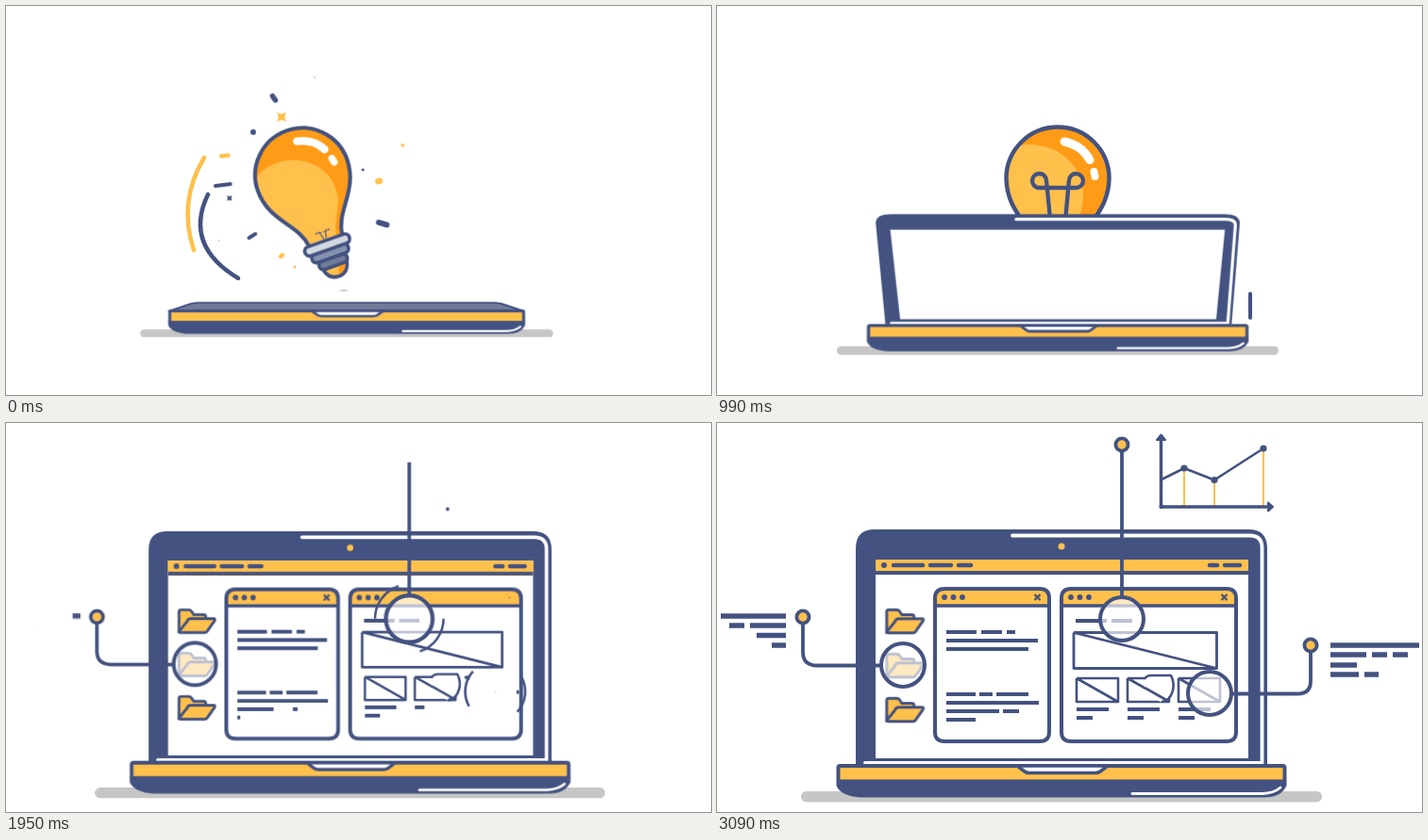
Write an HTML page that moves like this. It is 747x413 px and loops after 3120 ms.

```html
<!DOCTYPE html>
<html lang="en">
<head>
<meta charset="utf-8">
<title>Idea to laptop</title>
<style>
  html, body { margin: 0; width: 100%; height: 100%; overflow: hidden; background: #fff; }
  svg { display: block; width: 100%; height: 100%; }
  .navy { fill: #435280; }
  .sun { fill: #ffc04c; }
  .line { fill: none; stroke: #435280; }
  .edge { stroke: #435280; stroke-linejoin: round; }
  .shine { fill: none; stroke: #fff; stroke-linecap: round; }
  .shade { fill: #c6c6c6; }
  #stage { transform-origin: 346.6px 201.6px; }
</style>
</head>
<body>
<svg viewBox="0 0 747 413">
  <defs>
    <path id="glass" d="M341 243C338 213 307 201 306.500 162A54.500 54.500 0 0 1 415.500 162C415 201 384 213 381 243Z"/>
    <clipPath id="inGlass"><use href="#glass"/></clipPath>
  </defs>

  <g id="sparks"></g>
  <ellipse id="bulbShade" class="shade" cx="361" cy="302" rx="36" ry="4.500"/>

  <g id="bulb"><g transform="translate(-361 -287)">
    <use href="#glass" fill="#ff9b16"/>
    <g clip-path="url(#inGlass)"><path id="glow" class="sun"/></g>
    <g id="filament"><path class="line" stroke-width="4.300" transform="translate(-361 -240)"
      d="M356.500 240 349 164A7.500 7.500 0 1 0 341.500 172H380A7.500 7.500 0 1 0 373 164L366 240"/></g>
    <use href="#glass" class="line" stroke-width="4.500"/>
    <path class="shine" stroke-width="9" d="M368 123Q387 127 395 142.500"/>
    <path class="shine" stroke-width="8" d="M399.500 155 400.500 160"/>
    <g class="edge" stroke-width="4">
      <path class="sun" d="M347 273H376Q373 286 361.500 286Q350 286 347 273Z"/>
      <path fill="#ff9b16" stroke="none" d="M365 274H374Q371 283 363 284Z"/>
      <rect x="344" y="263" width="34" height="10" rx="5" fill="#717c9a"/>
      <rect x="339" y="252" width="44" height="11" rx="5" fill="#8592b0"/>
      <rect x="334" y="242" width="54" height="11" rx="5" fill="#d3d9e0"/>
    </g>
  </g></g>

  <g id="stage">
    <g id="lid">
      <path id="shell" class="navy"/>
      <path id="screen" fill="#fff"/>
      <path id="rim" class="shine" stroke-width="3.800"/>
    </g>
    <g id="base">
      <rect class="shade" x="89" y="391" width="552" height="11.500" rx="5.700"/>
      <path id="cover" class="edge" fill="#717a97" stroke-width="3.500" d="M128 364 157 350Q162 348 167 348H562Q567 348 572 350L601 364Z"/>
      <path class="navy" d="M126.500 379H603.500V385Q598 397.500 580 397.500H152Q131 396 126.500 385Z"/>
      <rect class="sun edge" x="128.500" y="364" width="473" height="16.500" rx="2" stroke-width="4"/>
      <path class="edge" fill="#fff" stroke-width="3.500" d="M318 364 326 370Q328 371.500 331 371.500H401Q404 371.500 406 370L414 364Z"/>
      <path class="shine" stroke-width="2.800" d="M440 393.500H578Q590 393 597 387"/>
    </g>
    <g id="desk"></g>
  </g>
</svg>
<script>
const LOOP = 3120, NAVY = '#435280', SUN = '#ffc04c';
const $ = id => document.getElementById(id);
const desk = $('desk'), sparks = $('sparks');
let css = '', count = 0;

function add(parent, tag, attrs) {
  const el = document.createElementNS('http://www.w3.org/2000/svg', tag);
  for (const name in attrs) el.setAttribute(name, attrs[name]);
  return parent.appendChild(el);
}

// Frames are [ms, declarations]; the first and last are held to the loop's ends.
function key(el, frames, ease = 'ease-in-out') {
  const steps = [[0, frames[0][1]], ...frames, [LOOP, frames.at(-1)[1]]];
  const rules = steps.map(([ms, rule]) => `${(ms / LOOP * 100).toFixed(3)}%{${rule}}`);
  css += `@keyframes k${count}{${rules.join('')}}`;
  el.style.animation = `k${count++} ${LOOP}ms ${ease} infinite`;
}

function pop(el, x, y, start, dur = 180) {
  el.style.transformOrigin = `${x}px ${y}px`;
  key(el, [[start, 'transform:scale(0)'], [start + dur * .7, 'transform:scale(1.1)'], [start + dur, 'transform:scale(1)']]);
}

function draw(parent, d, start, dur, width, color = NAVY, leave) {
  const el = add(parent, 'path', {
    d, pathLength: 1, fill: 'none', stroke: color, 'stroke-width': width,
    'stroke-linejoin': 'round', 'stroke-dasharray': '1 2'
  });
  const frames = [[start, 'stroke-dashoffset:1.02'], [start + dur, 'stroke-dashoffset:0']];
  if (leave) frames.push([start + dur + leave, 'stroke-dashoffset:-1.02']);
  key(el, frames);
  return el;
}

// Each row is [y, from, to, from, to, ...]; with a side, bars stretch from it.
function words(rows, start, stagger, width, side) {
  rows.forEach(([y, ...xs], row) => {
    for (let i = 0; i < xs.length; i += 2) {
      const [a, b] = [xs[i], xs[i + 1]], at = start + row * stagger + i * 15, d = `M${a} ${y}H${b}`;
      if (!side) { draw(desk, d, at, 130, width); continue; }
      const el = add(desk, 'path', { d, class: 'line', 'stroke-width': width });
      el.style.transformOrigin = `${side === 'left' ? a : b}px 0`;
      key(el, [[at, 'transform:scaleX(0)'], [at + 300, 'transform:scaleX(1.03)'], [at + 650, 'transform:scaleX(1)']]);
    }
  });
}

/* Bulb */
const tilt = (ms, x, y, deg, size) => [ms, `transform:translate(${x}px,${y}px) rotate(${deg}deg) scale(${size})`];
key($('bulb'), [
  tilt(0, 352.5, 288, -19.5, .92), tilt(150, 364, 285, 9, .98), tilt(290, 360, 287, -4, 1.01),
  tilt(430, 361, 287, 0, 1), tilt(580, 361, 285, 0, 1), tilt(690, 361, 287, 0, 1),
  tilt(850, 361, 287, 0, 1), tilt(990, 361, 308, 0, 1), tilt(1190, 361, 350, 0, 1), tilt(1200, 361, 350, 0, 0)
]);
key($('glow'), [
  [0, 'd:path("M309 147C345 125 393 150 392 190C392 212 377 220 374 245L300 250L290 150Z")'],
  [350, 'd:path("M320 127C350 121 388 140 388 180C388 205 372 220 369 245L300 250L290 150Z")']
]);
const filament = (ms, x, y) => [ms, `transform:translate(361px,240px) scale(${x},${y})`];
key($('filament'), [filament(0, .3, .12), filament(260, 1.03, 1.05), filament(380, 1, 1)]);
$('bulbShade').style.transformOrigin = '361px 302px';
key($('bulbShade'), [[0, 'transform:translateX(-3px) scale(.12,.25)'], [400, 'transform:none'],
  [850, 'transform:none'], [940, 'transform:scale(0)']]);

/* Burst: x, y, length, thickness, angle, colour */
[
  [284, 98, 11, 5.5, 55, NAVY], [262, 134, 6, 6, 0, NAVY], [232, 159, 12, 4.5, -5, SUN],
  [230, 190, 20, 4, -7, NAVY], [261, 244, 12, 4, -32, NAVY], [292, 265, 7, 4.5, -40, SUN],
  [306, 277, 3, 3, 0, SUN], [378, 174, 3, 3, 0, NAVY], [395, 186, 8, 6.5, -10, SUN],
  [420, 148, 4, 3, 40, SUN], [399, 231, 15, 6, 17, NAVY], [327, 76, 1.5, 1.5, 0, '#999'], [226, 249, 1.5, 1.5, 0, '#999']
].forEach(([x, y, w, h, angle, fill]) => {
  const g = add(sparks, 'g', {});
  add(g, 'rect', { x: -w / 2, y: -h / 2, width: w, height: h, rx: h / 2, fill, transform: `rotate(${angle})` });
  fly(g, x, y);
});
[[292, 118, 1, SUN], [237, 204, .55, NAVY]].forEach(([x, y, size, fill]) => {
  const g = add(sparks, 'g', {});
  add(g, 'path', { d: 'M-5-5Q0-2 5-5Q2 0 5 5Q0 2-5 5Q-2 0-5-5Z', fill, transform: `scale(${size})` });
  fly(g, x, y);
});
function fly(el, x, y) {
  const out = (v, c) => v + (v - c) * .5;
  key(el, [[0, `transform:translate(${x}px,${y}px) scale(1)`],
    [380, `transform:translate(${out(x, 318)}px,${out(y, 200)}px) scale(0)`]], 'ease-out');
}
[['M199 259Q182 208 210 161', SUN], ['M246 289Q188 254 214 200', NAVY]].forEach(([d, color]) => {
  const arc = add(sparks, 'path', {
    d, pathLength: 1, fill: 'none', stroke: color, 'stroke-width': 4.5, 'stroke-linecap': 'round', 'stroke-dasharray': '1 2'
  });
  key(arc, [[0, 'stroke-dashoffset:0'], [220, 'stroke-dashoffset:-1.02']]);
});

/* Laptop */
key($('stage'), [[990, 'transform:translateX(-1.2px) scale(.8478)'], [1300, 'transform:translateX(0) scale(.8517)'],
  [1500, 'transform:translateX(0) scale(.8517)'], [2110, 'transform:translateX(0) scale(1)']]);
const base = (ms, y, sx, sy) => [ms, `transform:translate(365px,${y}px) scale(${sx},${sy}) translate(-365px,-363px)`];
key($('base'), [base(0, 344.8, .935, .857), base(400, 349, 1, .857), base(840, 349, 1, .857),
  base(980, 363, 1, .96), base(1080, 363, 1, 1)]);
$('cover').style.transformOrigin = '0 364px';
key($('cover'), [[0, 'transform:scaleY(.75);opacity:1'], [400, 'transform:scaleY(1);opacity:1'],
  [840, 'transform:scaleY(1);opacity:1'], [900, 'transform:scaleY(0);opacity:1'], [901, 'transform:scaleY(0);opacity:0']]);
key($('lid'), [[880, 'opacity:0'], [881, 'opacity:1']]);

const poses = [[880, 345, 12], [990, 224.4, 9.5], [1170, 110.5, -1], [1290, 113, 0]];
const open = (id, shape) => key($(id), poses.map(([ms, top, flare]) =>
  [ms, `d:path("${shape(top, flare, (363 - top) / 250)}")`]));
open('shell', (y, f, k) => {
  const l = 147 - f, r = 583 + f, c = y + 20 * k;
  return `M${147 + f * .3} 365L${l} ${c}Q${l} ${y} ${l + 20} ${y}L${r - 20} ${y}Q${r} ${y} ${r} ${c}L${583 - f * .1} 365Z`;
});
open('screen', (y, f, k) => {
  const top = y + 4 + 28 * k;
  return `M168 356L${168 - f * 1.3} ${top}L${563 + f * 1.15} ${top}L563 356Z`;
});
open('rim', (y, f, k) => {
  const r = 577.5 + f, t = y + 6.5;
  return `M313 ${t}L${r - 13} ${t}Q${r} ${t} ${r} ${t + 13 * k}L577.5 361L157 361`;
});
[[565, 935], [161, 988]].forEach(([x, at]) =>
  draw(sparks, `M${x} 305V331`, at, 50, 4, NAVY, 60).setAttribute('stroke-linecap', 'round'));

/* Desktop */
pop(add(desk, 'circle', { cx: 365, cy: 131, r: 3.5, fill: SUN }), 365, 131, 1230);
const bar = add(desk, 'g', {});
add(bar, 'rect', { x: 168, y: 145, width: 395, height: 13, fill: SUN });
add(bar, 'rect', { x: 168, y: 157, width: 395, height: 4, fill: NAVY });
bar.style.transformOrigin = '0 145px';
key(bar, [[1250, 'transform:scaleY(0)'], [1330, 'transform:scaleY(1)']]);
pop(add(desk, 'circle', { cx: 177, cy: 151, r: 3, fill: NAVY }), 177, 151, 1360);
[[187, 218], [226, 248], [256, 269], [522, 530], [538, 554]].forEach(([a, b], i) =>
  draw(desk, `M${a} 151H${b}`, 1385 + i * 30, 150, 4.5).setAttribute('stroke-linecap', 'round'));

[210, 257, 304].forEach((y, i) => {
  const g = add(desk, 'g', {}), at = 1210 + i * 95;
  const icon = add(g, 'g', { transform: `translate(198 ${y}) scale(1.07)`, class: 'sun edge', 'stroke-width': 2.8 });
  add(icon, 'path', { d: 'M-17 10V-9q0-2 2-2h8q2 0 3 2l2 3h10q2 0 2 2v6z' });
  add(icon, 'path', { d: 'M-17 11-9 1q1-3 4-3H18q2 0 1 2L12 10q-1 2-3 2H-15q-3 0-2-1z' });
  g.style.transformOrigin = `198px ${y + 14}px`;
  key(g, [[at, 'transform:scaleY(0)'], [at + 200, 'transform:scaleY(1.1)'], [at + 270, 'transform:scaleY(1)']]);
});
draw(desk, 'M175 234Q185 225 197 225', 1330, 70, 4, NAVY, 70);

function panel(x, w, start) {
  const r = x + w, title = add(desk, 'path', {
    d: `M${x} 193V186Q${x} 176 ${x + 10} 176H${r - 10}Q${r} 176 ${r} 186V193Z`, fill: SUN
  });
  key(title, [[start + 180, 'opacity:0'], [start + 260, 'opacity:1']]);
  draw(desk, `M${x} 194H${r}`, start + 150, 180, 3.5);
  draw(desk, `M${x} 196V186Q${x} 176 ${x + 10} 176H${r - 10}Q${r} 176 ${r} 186V328Q${r} 338 ${r - 10} 338H${x + 10}Q${x} 338 ${x} 328V194`, start, 330, 4);
  for (let i = 0; i < 3; i++) {
    const cx = x + 10 + i * 9.5;
    pop(add(desk, 'circle', { cx, cy: 185, r: 2.9, fill: NAVY }), cx, 185, start + 280 + i * 40);
  }
  const c = r - 12.5;
  pop(add(desk, 'path', { d: `M${c - 3} 182l6 6m0-6l-6 6`, class: 'line', 'stroke-width': 2.3 }), c, 185, start * 2 - 950);
}
panel(231, 121, 1350);
panel(365, 185, 1430);

words([[222, 243, 275, 280, 302, 307, 316], [231, 243, 340], [240, 243, 330]], 1640, 40, 4);
words([[288, 243, 274, 278, 292, 296, 330], [297, 243, 341], [306, 243, 299, 303, 320], [315, 243, 274]], 1770, 50, 4);

draw(desk, 'M378 222.500H529.500V260.500H378ZL529.500 260.500', 1660, 230, 2.8);
words([[210, 380, 413, 418, 440]], 1720, 0, 4);
[381, 435, 489].forEach((x, i) => {
  const at = 1700 + i * 110;
  draw(desk, `M${x} 271H${x + 44}V296H${x}ZL${x + 44} 296`, at, 200, 2.6);
  words([[304, x, x + 34], [313, x, x + 17]], at + 90, 50, 4);
});
const bump = add(desk, 'g', { class: 'edge', fill: '#fff', 'stroke-width': 2.6 });
add(bump, 'path', { d: 'M453 273Q454 268 460 268H481Q485 276 483 284Q480 295 470 296L453 288', stroke: 'none' });
add(bump, 'path', { d: 'M453 272Q455 268 460 268H481Q485 276 483 284Q480 295 471 296M453 281 476 294', fill: 'none' });
key(bump, [[1860, 'opacity:0'], [1930, 'opacity:1']]);

/* Callouts */
function callout(x, y, lensAt, route, lineAt, nx, ny) {
  draw(desk, route, lineAt, 180, 3.8);
  const g = add(desk, 'g', {});
  add(g, 'circle', { cx: x, cy: y, r: 23, fill: '#fff', 'fill-opacity': .65, class: 'edge', 'stroke-width': 4 });
  pop(g, x, y, lensAt, 210);
  const ring = add(desk, 'circle', { cx: x, cy: y, r: 36, pathLength: 1, class: 'line', 'stroke-dasharray': '.2 .3' });
  ring.style.transformOrigin = `${x}px ${y}px`;
  const ripple = (ms, size, deg, width) => [lensAt + ms, `transform:scale(${size}) rotate(${deg}deg);stroke-width:${width}px`];
  key(ring, [ripple(-20, .2, -60, 0), ripple(10, .9, -30, 3), ripple(150, 1.03, 0, 2.5), ripple(220, 1.15, 40, 0)]);
  pop(add(desk, 'circle', { cx: nx, cy: ny, r: 6.6, class: 'sun edge', 'stroke-width': 3.8 }), nx, ny, lineAt + 160);
}
callout(197, 257, 1650, 'M174 257.500H106Q91 257.500 91 243V213', 1690, 91, 206);
callout(429, 208, 1800, 'M429 185V30', 1800, 429, 23);
callout(522, 287, 1930, 'M545 287.500H615Q629 287.500 629 274V243', 1925, 629, 236);
words([[205, 4, 73], [215, 13, 29, 35, 73], [225.5, 42, 73], [236, 58, 73]], 1880, 60, 5.5, 'right');
words([[236, 650, 744], [246, 650, 688, 694, 710, 716, 732], [257, 650, 678], [267, 650, 680, 686, 701]], 2110, 85, 5.5, 'left');

/* Chart */
[[495, 48], [527, 60.5], [579, 27]].forEach(([x, y], i) => {
  draw(desk, `M${x} 89V${y}`, 2180 + i * 50, 200, 2, SUN);
  pop(add(desk, 'circle', { cx: x, cy: y, r: 3.6, fill: NAVY }), x, y, [2310, 2430, 2580][i], 150);
});
draw(desk, 'M471 60 495 48 527 60.500 579 27', 2250, 340, 2.6);
draw(desk, 'M470.500 90V17', 1960, 220, 3.5);
draw(desk, 'M469 89H585', 1960, 220, 3.5);
pop(add(desk, 'circle', { cx: 470.5, cy: 89, r: 2, fill: NAVY }), 470.5, 89, 1860, 90);
[['M466 18 470.500 12.500 475 18Z', 470.5, 17], ['M584 84.500 589 89 584 93.500Z', 585, 89]].forEach(([d, x, y]) =>
  pop(add(desk, 'path', { d, class: 'navy edge', 'stroke-width': 2 }), x, y, 2140));

add(document.querySelector('svg'), 'style', {}).textContent = css;
</script>
</body>
</html>
```
